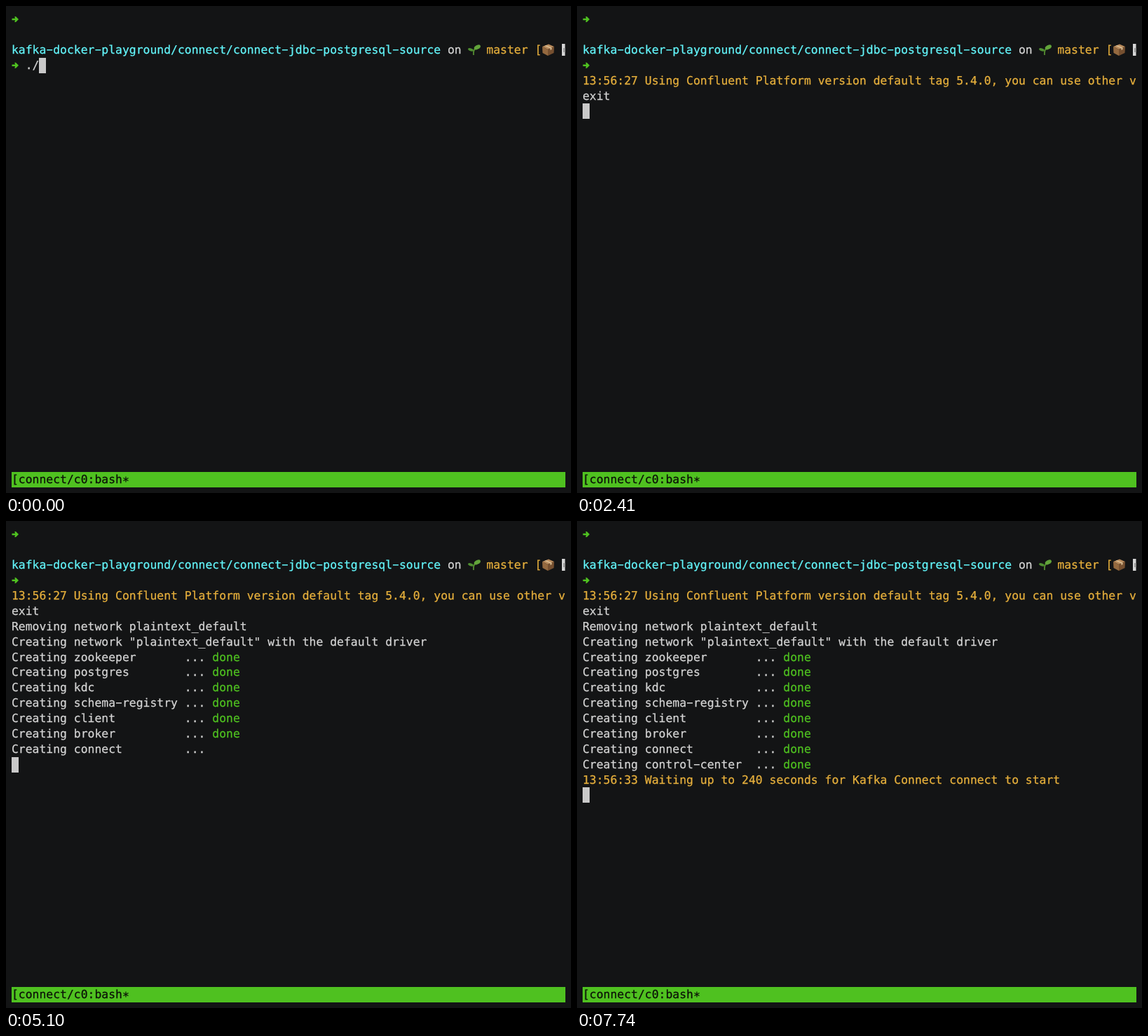
Animation of 806 by 695 pixels, one loop 8000 ms. Source, as an HTML page with a canvas:

```html
<!DOCTYPE html>
<html lang="en">
<head>
<meta charset="utf-8">
<title>Terminal session</title>
<style>
  html, body { margin: 0; width: 100%; height: 100%; overflow: hidden; background: #131415; }
  canvas { display: block; }
</style>
</head>
<body>
<canvas id="stage" width="806" height="695"></canvas>
<script>
const ctx = document.getElementById('stage').getContext('2d');
const LOOP = 8000, PAD = 8, CELL = 9.873, ROW = 21.9;
const BG = '#131415', TEXT = '#d4d4d4', CYAN = '#63f6fb', YELLOW = '#e7b03c',
      GREEN = '#4fc120', CURSOR = '#c9c9c9';

const COMMAND = './postgres.sh';
const KEYS = [130, 240, 350, 460, 570, 680, 790, 900, 1030, 1160, 1290];
const ENTER = 1350;

// Output lines: [time, row, text, colour]
const LINES = [
  [1410, 4, '13:56:27 Using Confluent Platform version default tag 5.4.0, you can use other v', YELLOW],
  [2410, 5, 'exit', TEXT],
  [2670, 6, 'Removing network plaintext_default', TEXT],
  [3200, 7, 'Creating network "plaintext_default" with the default driver', TEXT],
  [6740, 16, '13:56:33 Waiting up to 240 seconds for Kafka Connect connect to start', YELLOW]
];

// Containers from row 8 on: [name, created, done, name width while pending]
const JOBS = [
  ['zookeeper', 3590, 4640, 9],
  ['postgres', 3590, 4580, 9],
  ['kdc', 3590, 4450, 15],
  ['schema-registry', 3590, 4580, 15],
  ['client', 3590, 4450, 15],
  ['broker', 4640, 5100, 15],
  ['connect', 5100, 5890, 15],
  ['control-center', 5890, 6680, 15]
];

const colX = c => PAD + c * CELL;
const rowY = r => PAD + r * ROW;

function box(x, y, w, h, color) {
  ctx.fillStyle = color;
  ctx.fillRect(x, y, w, h);
}

function poly(color, ...pts) {
  ctx.fillStyle = color;
  ctx.beginPath();
  for (let i = 0; i < pts.length; i += 2) ctx.lineTo(pts[i], pts[i + 1]);
  ctx.fill();
}

// One glyph per cell; hyphens are wide and the asterisk sits at mid height.
function print(text, x, row, color) {
  const base = Math.round(rowY(row) + 16.3);
  ctx.fillStyle = ctx.strokeStyle = color;
  [...text].forEach((ch, i) => {
    const cx = x + i * CELL;
    if (ch === '-') return ctx.fillRect(cx + 0.9, base - 6, 8, 1.5);
    const y = base + (ch === '*' ? 3 : 0);
    ctx.fillText(ch, cx, y);
    ctx.strokeText(ch, cx, y);
  });
}

function arrow(row) {
  const y = rowY(row) + 11;
  poly(GREEN, 8.5, y - 1.2, 13, y - 1.2, 12.3, y - 4, 14, y - 4, 18, y,
       14, y + 4, 12.3, y + 4, 13, y + 1.2, 8.5, y + 1.2);
}

function seedling() {
  ctx.lineWidth = 1.6;
  ctx.strokeStyle = '#5c9a35';
  ctx.beginPath();
  ctx.moveTo(667, 70);
  ctx.quadraticCurveTo(666.5, 64, 669, 61);
  ctx.stroke();
  const leaf = (color, x, y, rx, ry, turn) => {
    ctx.fillStyle = color;
    ctx.beginPath();
    ctx.ellipse(x, y, rx, ry, turn, 0, 7);
    ctx.fill();
  };
  leaf('#4f8f30', 663, 62.3, 4, 2, 0.3);
  leaf('#62a43a', 672.3, 58.8, 5, 2.8, -0.5);
}

function parcel() {
  poly('#b98b5c', 765, 58, 774, 54.5, 782, 58, 773, 62);
  poly('#94693f', 765, 58, 773, 62, 773, 71, 765.5, 67);
  poly('#765030', 782, 58, 773, 62, 773, 71, 781.5, 67);
  poly('#d9bd93', 768.5, 56.7, 770.5, 55.9, 778.5, 59.5, 778.5, 62, 776.5, 63, 776.5, 60.4);
}

function prompt() {
  arrow(0);
  print('kafka-docker-playground/connect/connect-jdbc-postgresql-source', PAD, 2, CYAN);
  print('on', colX(63), 2, TEXT);
  print('master [', 685.3, 2, YELLOW);
  seedling();
  parcel();
  box(793, 54, 4.5, 17, '#d6d6d6');
  box(795, 60, 2.5, 6, '#9b9b9b');
  arrow(3);
}

function draw(t) {
  box(0, 0, 806, 695, BG);
  ctx.font = '16.4px "DejaVu Sans Mono", monospace';
  ctx.textRendering = 'geometricPrecision';
  prompt();
  ctx.lineWidth = 0.25;

  let curCol = 0, curRow = 4;
  if (t < ENTER) {
    const typed = COMMAND.slice(0, 2 + KEYS.filter(k => t >= k).length);
    print(typed, colX(2), 3, TEXT);
    curCol = 2 + typed.length;
    curRow = 3;
  }
  for (const [at, row, text, color] of LINES) {
    if (t < at) continue;
    print(text, PAD, row, color);
    curRow = Math.max(curRow, row + 1);
  }
  JOBS.forEach(([name, made, done, width], i) => {
    if (t < made) return;
    const row = 8 + i, ready = t >= done;
    print(`Creating ${name.padEnd(ready ? 15 : width)} ...`, PAD, row, TEXT);
    if (ready) print('done', colX(29), row, GREEN);
    curRow = Math.max(curRow, row + 1);
  });

  box(Math.round(colX(curCol)), Math.round(rowY(curRow)), 10, 22, CURSOR);
  box(PAD, 665, 790, 22, GREEN);
  print('[connect/c0:bash*', PAD, 30, '#0c1208');
}

function frame(now) {
  draw(now % LOOP);
  requestAnimationFrame(frame);
}
ctx.lineWidth = 0.25;
requestAnimationFrame(frame);
</script>
</body>
</html>
```
